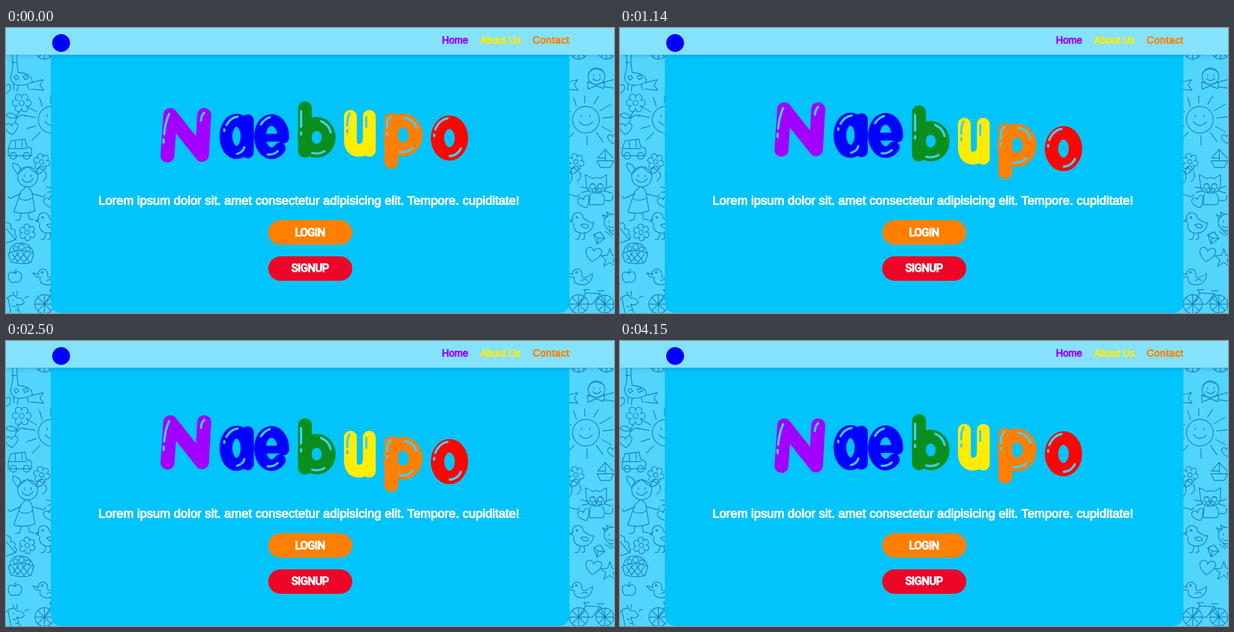
Write an HTML page that moves like this. It is 1092x513 px and loops after 4.22 s.

```html
<!DOCTYPE html>
<html lang="en">
<head>
<meta charset="utf-8">
<title>Naebupo</title>
<style>
  html, body { margin: 0; width: 100%; height: 100%; overflow: hidden; background: #52d5fb; }
  svg { display: block; width: 100%; height: 100%; }
  text { font: 22.35px "Liberation Sans", Arial, sans-serif; stroke-width: 1.2; stroke-linejoin: round; }
  nav, .bar { filter: drop-shadow(0 1px 4px rgba(0, 60, 110, .25)); }
  .menu text { font-size: 17.6px; }
  .buttons text { font: 500 20px Roboto, sans-serif; letter-spacing: -.7px; stroke-width: 1.1; text-anchor: middle; }
  .white { fill: #fff; stroke: #fff; }
  .purple { color: #a200ff; }
  .blue { color: #00f; }
  .green { color: #0a8f1e; }
  .yellow { color: #ffed00; }
  .orange { color: #ff8000; }
  .red { color: #fe0600; }
  .menu text { fill: currentColor; stroke: currentColor; }
  .doodles { fill: none; stroke: #1680c6; stroke-width: 1.4; stroke-linecap: round; stroke-linejoin: round; }
  .doodles *, #flower, #heart { vector-effect: non-scaling-stroke; }
  .letter { fill: none; stroke: currentColor; stroke-width: 25; stroke-linecap: round; stroke-linejoin: round; }
  .shine { stroke: #3fcfff; stroke-width: 4; }
</style>
</head>
<body>
<svg viewBox="0 0 1092 513" preserveAspectRatio="none">
  <defs>
    <path id="flower" d="M-6-4A5 5 0 1 1 0-8A5 5 0 1 1 7-4A5 5 0 1 1 7 4A5 5 0 1 1 0 8A5 5 0 1 1-7 4A5 5 0 1 1-6-4M-4 0a4 4 0 1 0 8 0a4 4 0 1 0-8 0"/>
    <path id="heart" d="M0-4C-3-13-15-8-10 1Q-7 7 1 11Q8 5 11-2C14-11 2-13 0-4"/>

    <g id="doodles" class="doodles">
      <!-- giraffe with a ribbon -->
      <path d="M11 48Q15 66 8 88Q10 103 24 103T47 97Q48 82 22 80Q19 64 20 48M10 62h8M14 88l5-3 4 5-5 4zM31 87l6-2 3 5-6 3zM14 101v11M22 103l-2 11M38 102l3 9M47 98L67 93 61 103 68 112 45 110M0 104Q7 98 8 106T0 117"/>
      <!-- flower and leaves -->
      <use href="#flower" transform="translate(28 135) scale(1.15)"/>
      <path d="M25 149Q18 158 17 170M20 160Q8 148 0 157Q8 166 20 160M35 159Q27 153 20 163"/>
      <!-- sun -->
      <circle cx="82" cy="165" r="24"/>
      <path d="M74 156v4M89 156v4M70 168Q81 182 94 169M55 151L36 140M53 161L31 157M54 176L38 181M61 188L47 202M65 141L60 125M80 135V122M96 137L105 123M107 149L128 137M112 162L131 160M110 177L128 187M101 188L113 205M84 194v17"/>
      <use href="#heart" transform="translate(10 181)"/>
      <use href="#heart" transform="translate(130 199) scale(.8)"/>
      <!-- car -->
      <path d="M4 217L9 203 34 200 37 213 46 217V230H4zM17 204v12M29 202v12M5 217H37"/>
      <circle cx="13" cy="230" r="6"/><circle cx="37" cy="230" r="6"/>
      <use href="#flower" transform="translate(64 241) rotate(15)"/>
      <!-- girl -->
      <circle cx="39" cy="268" r="18"/>
      <path d="M22 262Q31 254 39 249Q48 258 57 263M21 263Q9 249 13 243Q26 246 26 255M56 260Q56 247 67 249Q72 258 57 263M70 258Q77 268 66 276M33 264v4M45 264v4M29 272Q38 284 49 271M36 286L27 294 14 331Q31 337 52 329L46 293 39 286M27 298L7 307 4 303M47 298L68 304 71 299M27 334L25 345 17 347M40 333L42 344 50 345M24 307Q36 314 48 305"/>
      <!-- chick -->
      <path d="M59 344L53 347 59 350M58 347C55 329 76 327 78 343C88 348 91 353 96 350C94 366 83 371 72 369C63 367 58 360 61 352M72 369L69 380 63 381M79 368L80 379 75 381M73 354Q84 350 87 358Q80 364 73 354"/>
      <circle cx="66" cy="341" r="1.5"/>
      <!-- leaves, flower, basket -->
      <path d="M0 350Q12 352 8 361Q20 362 15 371Q24 377 12 383L0 387M0 361L18 382"/>
      <use href="#flower" transform="translate(38 368) rotate(25)"/>
      <path d="M4 406Q27 396 50 406L45 422Q27 427 9 421zM6 405Q9 386 27 387T49 405M12 407L21 421M19 405L32 422M29 404L42 421M44 407L32 422M35 404L20 421M23 404L12 418"/>
      <circle cx="17" cy="397" r="4"/><circle cx="28" cy="394" r="5"/><circle cx="39" cy="398" r="4"/>
      <!-- apple -->
      <path d="M16 442C7 435 2 443 5 451C8 461 14 458 17 457C28 461 31 444 25 440C21 437 18 439 16 442Q14 437 19 434"/>
      <!-- duck -->
      <path d="M59 443L48 441 54 448 60 449M58 445C56 431 75 430 75 444Q74 451 82 449L94 442C94 457 83 464 71 462C62 460 59 455 62 449M73 455Q82 450 85 455"/>
      <circle cx="65" cy="440" r="1.5"/>
      <!-- giraffe head -->
      <path d="M0 489Q4 481 15 481L20 486Q30 485 33 494Q27 501 19 497L25 513M15 481L12 475M20 482V474M4 487L9 513M13 490v1M12 500l5 2M17 508h5M34 486q4-4 7-2"/>
      <!-- bicycle wheels -->
      <circle cx="69" cy="497" r="17"/><circle cx="116" cy="497" r="16"/>
      <path d="M69 480V513M52 497H86M57 485L81 509M81 485L57 509M69 497L82 477 108 478 94 497zM116 481V513M100 497H132M105 486L127 508M127 486L105 508M108 478L116 497M103 473h12M82 477L78 471h10"/>
      <circle cx="69" cy="40" r="16"/><circle cx="119" cy="40" r="16"/>
      <path d="M69 40v16M69 40L59 52M69 40L80 52M119 40v16M119 40L109 52M119 40L130 52"/>
      <!-- boy with a bow -->
      <circle cx="101" cy="87" r="15"/>
      <path d="M87 82Q95 70 103 75Q111 74 115 82M96 84v2M107 84v2M94 91Q102 99 109 90M100 102L85 97 86 110 100 104 114 109 116 97 101 102M116 97L132 93M116 106L132 108"/>
      <!-- boat -->
      <path d="M102 239H132L126 251H108zM117 239V218L103 234H117M118 220L131 234"/>
      <!-- cat -->
      <path d="M83 283L81 264 94 271Q101 268 108 271L119 264 119 283C119 302 83 302 83 283M92 281h5M106 281h5M98 288h6l-3 4zM101 292Q97 298 93 292M101 292Q106 298 110 292M87 289L73 286M87 293L75 296M115 289L129 285M115 293L128 297M91 298Q84 312 89 318H113Q119 307 111 298M117 310Q132 314 130 301"/>
      <circle cx="94" cy="285" r="5"/><circle cx="108" cy="285" r="5"/>
      <use href="#heart" transform="translate(79 313) rotate(-15)"/>
      <!-- second child, kite, heart, star -->
      <circle cx="130" cy="350" r="15"/>
      <path d="M116 344L112 336 121 340 119 331 128 336M124 347v3M121 356Q128 362 134 357M96 372L108 367 116 379 102 389zM96 372L104 378 116 379M104 378L102 389M117 366L128 374M124 365L132 372"/>
      <use href="#heart" transform="translate(95 407) rotate(12) scale(1.25)"/>
      <path d="M125 397L129 409 141 410 131 417 135 429 125 422 114 429 118 417 109 410 121 409z"/>
    </g>
  </defs>

  <rect width="1092" height="513" fill="#52d5fb"/>
  <use href="#doodles"/>
  <use href="#doodles" x="959.5"/>
  <path d="M80.5 0H1012V492Q1012 513 991 513H101.500Q80.500 513 80.500 492z" fill="#00c4fb"/>

  <rect class="bar" width="1092" height="48" fill="#85e2fc"/>
  <circle cx="99" cy="27" r="16" fill="#00f"/>
  <g class="menu">
    <text class="purple" x="783" y="28">Home</text>
    <text class="yellow" x="852" y="28">About Us</text>
    <text class="orange" x="946" y="28" letter-spacing=".8">Contact</text>
  </g>

  <g role="img" aria-label="Naebupo">
    <g class="letter purple">
      <path d="M290 219L295 146L352 218L356 146"/>
      <path class="shine" d="M284 181Q286 159 293 144M283 190v6M350 156Q351 146 356 142"/>
    </g>
    <g class="letter blue">
      <ellipse cx="414" cy="190.500" rx="19" ry="29" stroke-width="23"/>
      <path d="M434 162V219" stroke-width="22"/>
      <path d="M498 193A21 30 0 1 0 492 212" stroke-width="21"/>
      <path d="M460 193H498" stroke-width="14"/>
      <path class="shine" d="M396 170Q403 157 416 155M392 178v3M415 222Q426 219 428 210M458 169Q464 159 474 156M470 223Q481 224 488 217"/>
    </g>
    <g class="letter green">
      <path d="M537 144V220"/>
      <ellipse cx="558" cy="196" rx="21.500" ry="24"/>
      <path class="shine" d="M530 177V149M530 187v4M566 167Q580 173 583 187M550 224Q562 227 572 221"/>
    </g>
    <g class="letter yellow" stroke-width="22">
      <path d="M618.500 159V201Q619 220 634 220Q652 219 652.500 198V159V220" stroke-width="23"/>
      <path class="shine" d="M613 176Q612 162 617 154M613 184v4M647 178V160"/>
    </g>
    <g class="letter orange">
      <path d="M692 163V238"/>
      <ellipse cx="713" cy="190" rx="22.500" ry="26"/>
      <path class="shine" d="M684 178Q684 161 691 157M684 186v4M716 159Q732 162 737 177M707 221Q722 222 730 213"/>
    </g>
    <g class="letter red">
      <ellipse cx="796.500" cy="190.500" rx="21.500" ry="28.500" stroke-width="24"/>
      <path class="shine" d="M771 175Q778 158 793 155M769 184v3M797 223Q811 222 817 209"/>
    </g>
  </g>

  <text class="white" x="166" y="318">Lorem ipsum dolor sit. amet consectetur adipisicing elit. Tempore. cupiditate!</text>

  <g class="buttons">
    <rect x="471" y="346" width="151" height="44" rx="22" fill="#ff8000"/>
    <text class="white" x="546" y="375">LOGIN</text>
    <rect x="471" y="411" width="151" height="44" rx="22" fill="#ee0527"/>
    <text class="white" x="546" y="439">SIGNUP</text>
  </g>
</svg>

<script>
  const LOOP = 4220, STEPS = 54, BOUNCE = LOOP / 3;
  const FIRST_PEAK = 1123, STAGGER = 104, DROP = 30;
  const letters = document.querySelectorAll('.letter');

  function draw() {
    // The motion advances in discrete steps of about 78 ms.
    const step = Math.floor(performance.now() % LOOP / LOOP * STEPS);
    const time = step * LOOP / STEPS;
    letters.forEach((letter, i) => {
      const phase = (time - FIRST_PEAK - i * STAGGER) / BOUNCE * 2 * Math.PI;
      const y = DROP * (1 - Math.cos(phase)) / 2;
      letter.setAttribute('transform', `translate(0 ${y.toFixed(2)})`);
    });
    requestAnimationFrame(draw);
  }
  draw();
</script>
</body>
</html>
```
